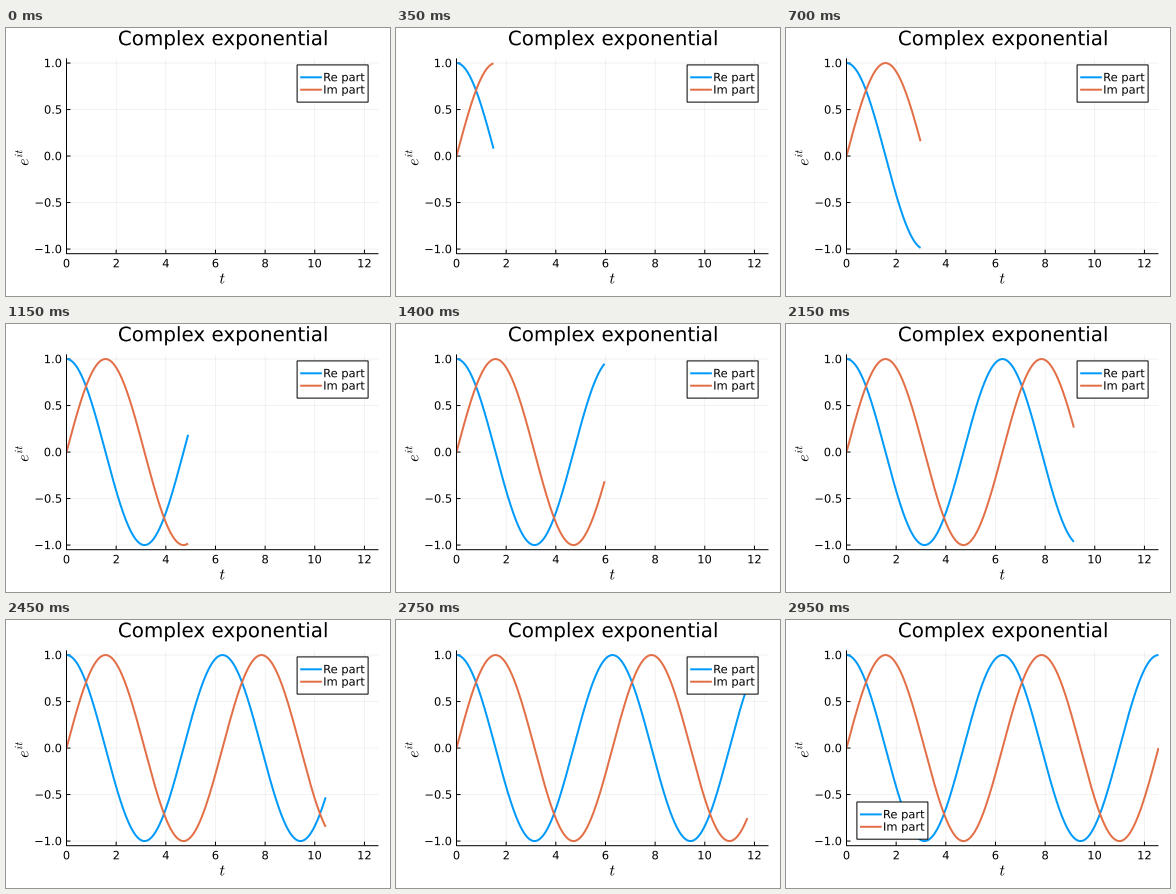
Write a matplotlib script that moves like this. It is 384x268 px and loops after 3000 ms.

```python
import numpy as np
import matplotlib.pyplot as plt
from matplotlib.animation import FuncAnimation
from matplotlib.patches import PathPatch, Rectangle
from matplotlib.textpath import TextPath
from matplotlib.transforms import Affine2D

W, H, DPI = 384, 268, 100
FRAMES, STEP = 60, 50
T_MAX, V_MAX = 4 * np.pi, 1.05
LEFT, RIGHT, TOP, BOTTOM = 60.5, 372.5, 30.4, 225.7
PAD_X, PAD_Y = (RIGHT - LEFT) / 30, (BOTTOM - TOP) / 30
BOX_W, ROW = 71, 12.4
BLUE, ORANGE = "#009AFA", "#E36F47"

plt.rcParams.update({
    "font.family": "DejaVu Sans",
    "mathtext.fontset": "cm",
    "path.snap": False,
})


def pt(px):
    return px * 72 / DPI


def to_x(t):
    return LEFT + (RIGHT - LEFT) * t / T_MAX


def to_y(v):
    return (TOP + BOTTOM) / 2 - (BOTTOM - TOP) / 2 * v / V_MAX


fig = plt.figure(figsize=(W / DPI, H / DPI), dpi=DPI, facecolor="white")
ax = fig.add_axes([0, 0, 1, 1])
ax.set(xlim=(0, W), ylim=(H, 0))
ax.axis("off")


def line(xs, ys, color="black", width=1.0, **kw):
    kw.setdefault("solid_capstyle", "butt")
    return ax.plot(xs, ys, color=color, lw=pt(width), **kw)[0]


def label(x, y, s, size=11.45, align=0.5, angle=0, zorder=3):
    """Outline text at subpixel position; align 0 is left, 1 is right."""
    path = TextPath((0, 0), s, size=size)
    box = path.get_extents()
    place = (Affine2D().translate(-box.x0 - align * box.width, 0)
             .scale(1, -1).rotate_deg(-angle).translate(x, y))
    return ax.add_patch(PathPatch(place.transform_path(path), fc="black",
                                  lw=0, zorder=zorder))


# Grid, ticks and tick labels
for t in range(0, 13, 2):
    x = to_x(t)
    line([x, x], [TOP, BOTTOM], width=0.5, alpha=0.1, zorder=1)
    line([x, x], [BOTTOM, BOTTOM - 4], zorder=3)
    label(x, 239.3, str(t))
for v in np.linspace(-1, 1, 5):
    y = to_y(v)
    line([LEFT, RIGHT], [y, y], width=0.5, alpha=0.1, zorder=1)
    line([LEFT, LEFT + 4], [y, y], zorder=3)
    label(55.2, y + 4.1, f"{v:.1f}".replace("-", "\u2212"), align=1)
line([LEFT, LEFT, RIGHT], [TOP, BOTTOM, BOTTOM], zorder=3,
     solid_joinstyle="miter")

label(216.8, 17.2, "Complex exponential", 19.9)
label(216.2, 255.4, "$t$", 15.8)
label(22.3, 129.6, "$e^{it}$", 15.8, angle=90)

# Curves, clipped to the plot area
area = Rectangle((LEFT, TOP), RIGHT - LEFT, BOTTOM - TOP,
                 transform=ax.transData)
curves = []
for f, color in ((np.cos, BLUE), (np.sin, ORANGE)):
    curve = line([], [], color, 2, zorder=4, solid_joinstyle="round")
    curve.set_clip_path(area)
    curves.append((curve, f))


def make_legend(x, y):
    box = Rectangle((x, y), BOX_W, 3 * ROW, fc="white", ec="black", lw=pt(1),
                    joinstyle="miter", zorder=5)
    parts = [ax.add_patch(box)]
    rows = (("Re part", BLUE), ("Im part", ORANGE))
    for k, (name, color) in enumerate(rows, 1):
        mid = y + k * ROW
        parts.append(line([x + 3.1, x + 24.8], [mid, mid], color, 2, zorder=6))
        parts.append(label(x + 27.2, mid + 3.9, name, align=0, zorder=6))
    return parts


legend_start = make_legend(RIGHT - PAD_X - BOX_W, TOP + PAD_Y)
legend_end = make_legend(LEFT + PAD_X, BOTTOM - PAD_Y - 3 * ROW)


def update(i):
    ts = np.linspace(0, T_MAX * i / (FRAMES - 1), 20 * i)
    for curve, f in curves:
        curve.set_data(to_x(ts), to_y(f(ts)))
    # The legend leaves its corner once the curve reaches it
    done = i == FRAMES - 1
    for part in legend_start:
        part.set_visible(not done)
    for part in legend_end:
        part.set_visible(done)
    return []


anim = FuncAnimation(fig, update, frames=FRAMES, interval=STEP,
                     repeat=True, repeat_delay=0, blit=False)
plt.show()
```
